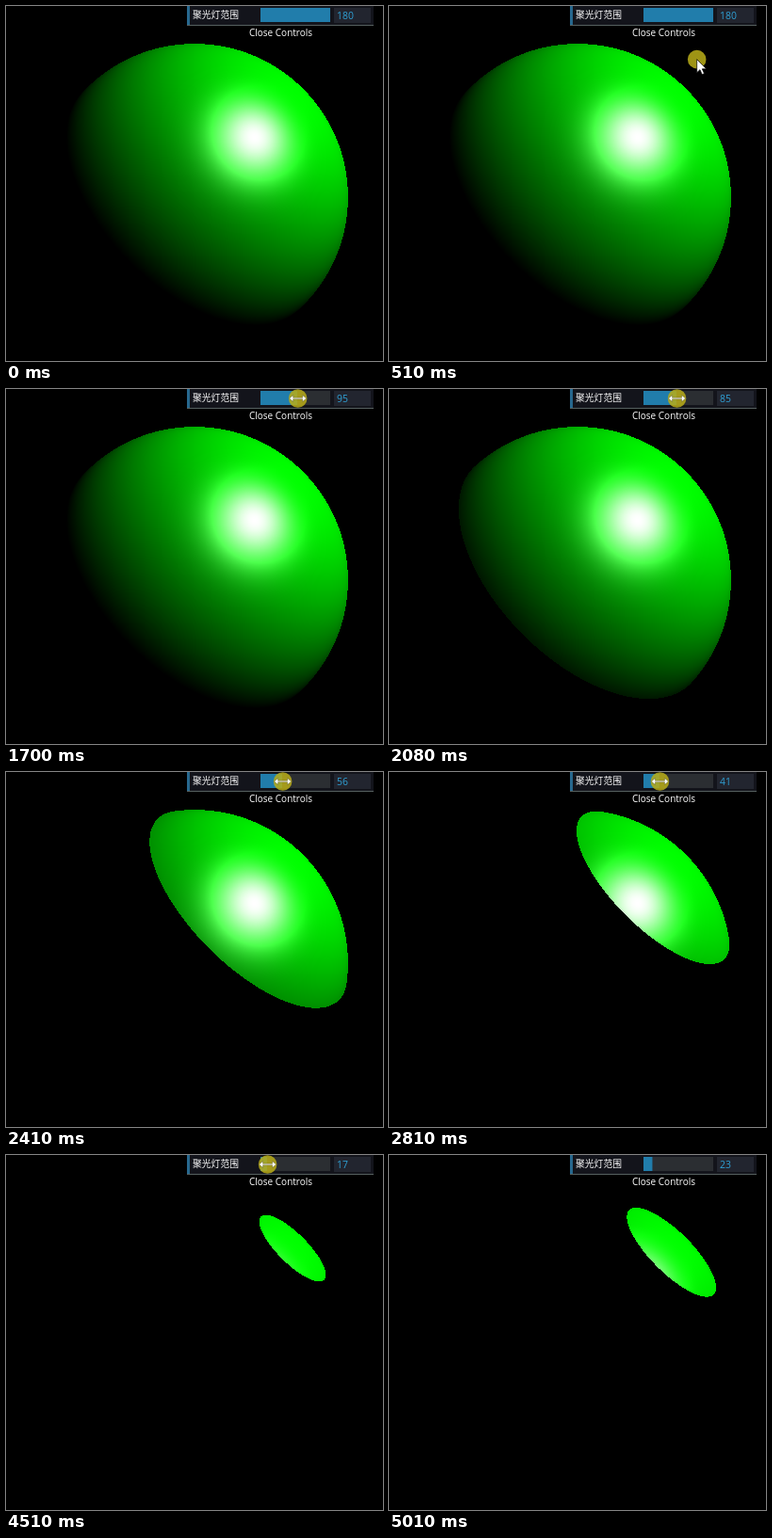
An HTML page with a canvas for the animation above (5.51 s loop, 400 by 377 pixels).

```html
<!DOCTYPE html>
<html lang="zh">
<head>
<meta charset="utf-8">
<title>Spotlight range</title>
<style>
  html, body { margin: 0; width: 100%; height: 100%; overflow: hidden; background: #000; }
  canvas, svg { position: absolute; left: 0; top: 0; width: 400px; height: 377px; display: block; }
  text { font-family: "Open Sans", "Noto Sans", sans-serif; font-size: 10px; fill: #fff; }
  .label { font-family: "Noto Sans CJK SC", "Noto Sans CJK", sans-serif; font-size: 9.8px; }
  #value { fill: #2fa1d6; font-size: 10.4px; }
</style>
</head>
<body>
<canvas id="scene" width="400" height="377"></canvas>
<svg viewBox="0 0 400 377">
  <rect x="192" width="198" height="20" fill="#13141b"/>
  <rect x="192" width="3" height="20" fill="#27688e"/>
  <rect x="192" y="20" width="198" height="1" fill="#56605f"/>
  <text class="label" x="198" y="13.3">聚光灯范围</text>
  <rect x="270" y="2" width="74" height="15" fill="#2b2e32"/>
  <rect id="fill" x="270" y="2" width="74" height="15" fill="#217dab"/>
  <rect x="348" y="2" width="39" height="16" fill="#22252f"/>
  <text id="value" x="351" y="13.6">180</text>
  <text x="291.5" y="32.3" text-anchor="middle">Close Controls</text>
  <g id="cursor">
    <circle r="9.8" fill="#b8ac18" fill-opacity=".86"/>
    <path id="resize" d="M-9 0l4-3.5v2.8H5v-2.8L9 0 5 3.5V.7H-5v2.8z" fill="#fff" stroke="#4a4510" stroke-width=".4"/>
    <path id="arrow" d="M0 0v14l3.3-3 2.2 5 2.3-1-2.2-4.8H10z" fill="#fff" stroke="#000" stroke-width=".7"/>
  </g>
</svg>
<script>
const W = 400, H = 377, LOOP = 5510;
const CX = 200, CY = 203;      // centre of projection
const FOCAL = 490, CAM = 3.17; // perspective, unit sphere
const LIGHT = [4, 4, 4], SHINE = 30;

// [ms, degrees]
const ANGLE = [[1130, 180], [1320, 165], [1650, 101], [1700, 95], [2080, 85], [2220, 75],
  [2410, 56], [2560, 48], [2810, 41], [2870, 39], [3000, 29], [3200, 29], [3300, 25],
  [3520, 19], [3690, 19], [3730, 17], [4510, 17], [4610, 23]];
// [ms, x, y]
const ENTER = [[30, 392, 370], [300, 352, 190], [550, 322, 32], [600, 320, 27],
  [790, 325, 24], [890, 344, 10]];
const LEAVE = [[4790, 280, 10], [4900, 330, 90], [5010, 408, 240]];

const $ = id => document.getElementById(id);
const dot = (a, b) => a[0] * b[0] + a[1] * b[1] + a[2] * b[2];
const unit = a => { const l = Math.hypot(...a); return a.map(v => v / l); };
const sub = (a, b) => a.map((v, i) => v - b[i]);

function sample(keys, t, col = 1) {
  const i = keys.findIndex(k => k[0] > t);
  if (i === 0) return keys[0][col];
  if (i < 0) return keys[keys.length - 1][col];
  const a = keys[i - 1], b = keys[i];
  return a[col] + (b[col] - a[col]) * (t - a[0]) / (b[0] - a[0]);
}

const ctx = $('scene').getContext('2d');
const image = ctx.createImageData(W, H);
const cosine = new Float32Array(W * H).fill(-2);

// Blinn-Phong shading, computed once; only the cone mask changes later.
function shade() {
  for (let py = 0; py < H; py++) for (let px = 0; px < W; px++) {
    const x = (px + .5 - CX) / FOCAL, y = (CY - py - .5) / FOCAL;
    const a = 1 + x * x + y * y;
    const disc = CAM * CAM - a * (CAM * CAM - 1);
    if (disc < 0) continue;
    const s = (CAM - Math.sqrt(disc)) / a;
    const n = [x * s, y * s, CAM - s];
    const l = unit(sub(LIGHT, n)), v = unit(sub([0, 0, CAM], n));
    const diffuse = dot(n, l);
    if (diffuse <= 0) continue;
    const half = unit(l.map((c, i) => c + v[i]));
    const spec = 255 * Math.max(0, dot(n, half)) ** SHINE;
    const i = py * W + px;
    cosine[i] = diffuse;
    image.data.set([spec, 255 * diffuse + spec, spec, 0], i * 4);
  }
}

let shown = null;
function drawSphere(deg) {
  const limit = deg >= 90 ? 0 : Math.cos(deg * Math.PI / 180);
  if (limit === shown) return;
  shown = limit;
  for (let i = 0; i < cosine.length; i++) image.data[i * 4 + 3] = cosine[i] >= limit ? 255 : 0;
  ctx.putImageData(image, 0, 0);
}

function drawCursor(t, edge) {
  const visible = t >= 30 && t < 5010;
  $('cursor').style.display = visible ? '' : 'none';
  if (!visible) return;
  const path = t < 1130 ? ENTER : t >= 4790 ? LEAVE : null;
  const x = path ? sample(path, t) : edge + .6;
  const y = path ? sample(path, t, 2) : 10;
  const onSlider = y < 18 && x < 346;
  $('cursor').setAttribute('transform', `translate(${x} ${y})`);
  $('resize').style.display = onSlider ? '' : 'none';
  $('arrow').style.display = onSlider ? 'none' : '';
}

function render(t) {
  const deg = Math.round(sample(ANGLE, t));
  const width = 74 * deg / 180;
  drawSphere(deg);
  $('fill').setAttribute('width', width);
  $('value').textContent = deg;
  drawCursor(t, 270 + width);
}

shade();
const start = performance.now();
function tick() {
  render((performance.now() - start) % LOOP);
  requestAnimationFrame(tick);
}
tick();
</script>
</body>
</html>
```
